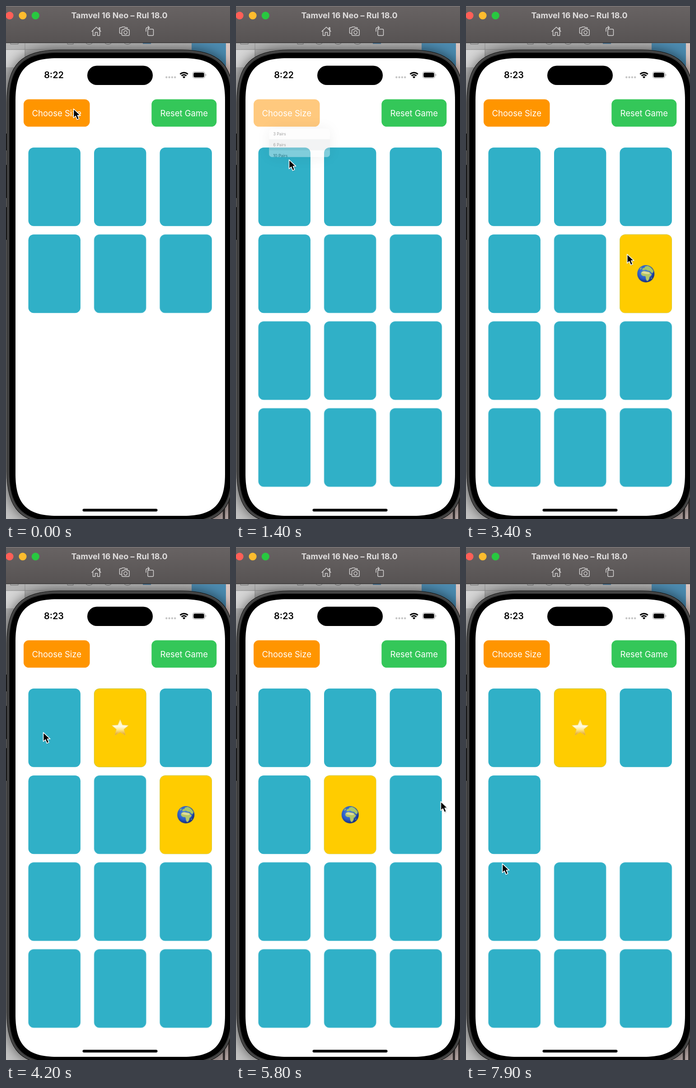
Animation, 496 px wide and 1130 px high, one loop 8000 ms. Source, as an HTML page:

```html
<!DOCTYPE html>
<html lang="en">
<head>
<meta charset="utf-8">
<title>Memory game</title>
<style>
html, body { margin: 0; width: 100%; height: 100%; overflow: hidden; background: #999; }
body { position: relative; font-family: Inter, "Open Sans", sans-serif; }
svg { position: absolute; left: 0; top: 0; width: 496px; height: 1130px; display: block; }
text { text-anchor: middle; }

/* every track runs on the same 8 s clock: 1.25% = 100 ms */
.t { animation: 8s linear infinite; }
.cut { animation-timing-function: step-end; }

#choose { animation-name: dim; }
@keyframes dim {
  0%, 1.25% { opacity: 1 }
  2.5%, 16.25% { opacity: .45 }
  17.5% { opacity: .5 }
  20.5%, 100% { opacity: 1 }
}

#menu {
  position: absolute; left: 0; top: 0; width: 288px; height: 153px; overflow: hidden;
  border-radius: 14px; background: #f9f9f9; color: #111; font-size: 18.5px;
  box-shadow: 0 0 70px rgba(0, 0, 0, .16); transform-origin: 0 0;
  animation-name: menu;
}
#menu div {
  height: 50px; line-height: 50px; padding-left: 20px; border-bottom: 1px solid #e4e4e4;
}
#menu .pick { animation-name: pick; }
@keyframes menu {
  0%, 6.25% { transform: translate(73px, 270px) scale(.47); opacity: 0; height: 134px;
    animation-timing-function: cubic-bezier(.2, .8, .3, 1) }
  10%, 16.25% { transform: translate(39px, 275px) scale(1); opacity: 1; height: 153px }
  17.5% { transform: translate(73px, 270px) scale(.47); opacity: .4; height: 134px }
  19.5%, 100% { transform: translate(95px, 266px) scale(.2); opacity: 0; height: 120px }
}
@keyframes pick {
  0% { background: #f9f9f9 }
  15%, 100% { background: #dfe1e2 }
}

#early { animation-name: early; }
#late { animation-name: late; }
@keyframes early { 0% { visibility: visible } 42.5%, 100% { visibility: hidden } }
@keyframes late { 0% { visibility: hidden } 42.5%, 100% { visibility: visible } }

.added { animation-name: added; }
.matched { animation-name: matched; }
@keyframes added { 0% { opacity: 0 } 16.25%, 100% { opacity: 1 } }
@keyframes matched { 0% { opacity: 1 } 80%, 100% { opacity: 0 } }

/* face-up periods of each turned card */
@keyframes face0 { 0%, 40%, 66.25%, 100% { opacity: 0 } 25%, 55% { opacity: 1 } }
@keyframes face1 { 0%, 55% { opacity: 0 } 48.75%, 93.75%, 100% { opacity: 1 } }
@keyframes face2 { 0%, 93.75%, 100% { opacity: 0 } 80% { opacity: 1 } }
@keyframes face4 { 0%, 40% { opacity: 0 } 32.5%, 63.75%, 100% { opacity: 1 } }
@keyframes face5 { 0%, 55% { opacity: 0 } 40%, 75%, 100% { opacity: 1 } }
@keyframes face7 { 0%, 93.75%, 100% { opacity: 0 } 85% { opacity: 1 } }

#cursor { animation-name: move; }
@keyframes move {
  0%, 6.25% { transform: translate(149px, 226px) }
  8.75% { transform: translate(147px, 236px) }
  13.75% { transform: translate(118px, 304px) }
  16.25% { transform: translate(116px, 312px) }
  17.5% { transform: translate(117px, 338px) }
  21.25% { transform: translate(110px, 392px) }
  25%, 27.5% { transform: translate(108px, 396px) }
  31.25% { transform: translate(232px, 575px) }
  33.75% { transform: translate(242px, 581px) }
  35% { transform: translate(250px, 582px) }
  38.75% { transform: translate(385px, 590px) }
  41.25% { transform: translate(390px, 590px) }
  45% { transform: translate(290px, 460px) }
  47.5%, 49.5% { transform: translate(242px, 414px) }
  52.5% { transform: translate(82px, 408px) }
  55% { transform: translate(95px, 398px) }
  60%, 62.4% { transform: translate(97px, 389px) }
  62.5%, 66.25% { transform: translate(238px, 591px) }
  69% { transform: translate(310px, 576px) }
  72.5% { transform: translate(453px, 560px) }
  75% { transform: translate(422px, 578px) }
  77.5% { transform: translate(412px, 556px) }
  80% { transform: translate(392px, 415px) }
  81.25% { transform: translate(380px, 440px) }
  85% { transform: translate(246px, 790px) }
  86.25%, 88.75% { transform: translate(244px, 810px) }
  92.5% { transform: translate(246px, 430px) }
  96%, 97.5% { transform: translate(245px, 418px) }
  98.7%, 100% { transform: translate(80px, 697px) }
}
</style>
</head>
<body>
<svg viewBox="0 0 496 1130">
  <defs>
    <linearGradient id="bar" x2="0" y2="1">
      <stop stop-color="#686363"/><stop offset="1" stop-color="#575353"/>
    </linearGradient>
    <linearGradient id="desk" x2="0" y2="1">
      <stop stop-color="#b4b4b4"/><stop offset=".5" stop-color="#b0b0b0"/><stop offset="1" stop-color="#c4c4c4"/>
    </linearGradient>
    <linearGradient id="blue" x2="0" y2="1">
      <stop stop-color="#4d8bb0"/><stop offset="1" stop-color="#3f83a8"/>
    </linearGradient>
    <linearGradient id="gold" x2="0" y2="1">
      <stop stop-color="#fff6a8"/><stop offset=".45" stop-color="#fffbe2"/><stop offset=".65" stop-color="#ffe88a"/><stop offset="1" stop-color="#dc981c"/>
    </linearGradient>
    <linearGradient id="glow" x2="1" y2="1">
      <stop offset=".4" stop-color="#ffe98a"/><stop offset=".75" stop-color="#ffe07a"/><stop offset="1" stop-color="#d9a72e"/>
    </linearGradient>
    <linearGradient id="hull">
      <stop stop-color="#7fb2d6"/><stop offset=".35" stop-color="#d3e3ee"/><stop offset=".65" stop-color="#a5bfd2"/><stop offset="1" stop-color="#4b6f8f"/>
    </linearGradient>
    <radialGradient id="sea" cx=".42" cy=".38" r=".62">
      <stop stop-color="#4f86e0"/><stop offset=".65" stop-color="#2a5bc6"/><stop offset="1" stop-color="#142c80"/>
    </radialGradient>
    <filter id="soft" x="-20%" y="-20%" width="140%" height="140%"><feGaussianBlur stdDeviation="14"/></filter>

    <path id="body" d="M2 213C2 129 34 97 118 97H388C472 97 504 129 504 213V1025C504 1109 472 1141 388 1141H118C34 1141 2 1109 2 1025Z"/>
    <g id="rocket" >
      <g transform="rotate(47)">
        <path d="M-6 13Q-8 20-5 25L-2 22L0 27L3 22L6 24Q8 19 6 13Z" fill="#f9a11b"/>
        <path d="M-4 13Q-5 18-2 20L0 23L2 20Q5 18 4 13Z" fill="#fff27a"/>
        <path d="M-6-2Q-14 5-11 18L-4 13ZM6-2Q14 5 11 18L4 13Z" fill="#e3211c"/>
        <path d="M0-27Q8.500-18 8.500-6Q8.500 6 5 14H-5Q-8.500 6-8.500-6Q-8.500-18 0-27Z" fill="url(#hull)"/>
        <path d="M0-27Q3.500-23.500 5.200-19.500Q0-17.500-5.200-19.500Q-3.500-23.500 0-27Z" fill="#5f87a8"/>
        <circle cy="-8" r="5" fill="#6b4650"/><circle cy="-8" r="3.600" fill="#11161f"/>
        <path d="M-1.300 4H1.300V17H-1.300Z" fill="#c11a14"/>
      </g>
    </g>
    <g id="earth">
      <circle r="19" fill="url(#sea)"/>
      <path d="M-11-1Q-9-6-4-6L2-5L8-4Q10 0 13 1Q12 5 8 7Q8 13 4 16Q1 16 0 11Q0 6-2 5Q-10 6-11-1Z" fill="#b4c666"/>
      <path d="M-10-2Q-8-5-3-5L7-3L9 0Q0 2-10-2Z" fill="#e2dc9a"/>
      <path d="M-8-8L-7-12L-3-13L-2-16L4-17.500Q13-14 17-6L15-1L11-3L9-6L4-7L0-9L-4-8Z" fill="#a9c766"/>
      <path d="M-14-9L-12-13L-9-14L-10-10ZM11 12L13 8L14 10Z" fill="#9cc065"/>
    </g>
    <path id="star" fill="url(#gold)" stroke="#f0c64a" stroke-width=".8" stroke-linejoin="round"
      d="M0-19L5.200-6.400L19-5.600L8.400 3.200L12 17L0 9.600L-12 17L-8.400 3.200L-19-5.600L-5.200-6.400Z"/>
    <g id="rainbow" fill="none" stroke-width="3.700"></g>
    <path id="moon" fill="url(#glow)" stroke="#c99d2c" stroke-width=".5"
      d="M8-18A19 19 0 1 1-18 8A18 18 0 0 0 8-18Z"/>
  </defs>

  <!-- desktop behind the window -->
  <rect width="496" height="1130" fill="url(#desk)"/>
  <path d="M0 96H42V135H0Z" fill="#d6d6d6"/>
  <path d="M42 82V150M0 96H411" stroke="#8b8b8b" fill="none"/>
  <path d="M10 82V84H27V82M136 82V84H149V82M177 82Q184 87 191 82M219 82Q226 87 233 82M262 82Q269 87 276 82" stroke="#666" fill="none"/>
  <path d="M303 82H321" stroke="#4e7d9f" stroke-width="3"/>
  <path d="M411 82H487V180H411Z" fill="url(#blue)"/>
  <path d="M487 82H496V200H487Z" fill="#d9c5c0"/>
  <path d="M440 1080H496V1130H440Z" fill="#b9a9a7"/>
  <path d="M480 1080H485V1130H480ZM492 1080H496V1130H492Z" fill="#3a3434"/>
  <use href="#body" filter="url(#soft)" opacity=".6"/>

  <!-- phone -->
  <path d="M0 281H4V318H0ZM0 350H4V423H0ZM0 443H4V515H0Z" fill="#1a1a1a"/>
  <use href="#body" fill="#3d3d3d" stroke="#1b1b1b" stroke-width="1.500"/>
  <path d="M3.800 213C3.800 130 35 98.800 118 98.800H388C471 98.800 502 130 502 213V1025C502 1108 471 1139 388 1139H118C35 1139 3.800 1108 3.800 1025Z" fill="none" stroke="#606060"/>
  <path d="M7.500 212C7.500 133 37.500 103 116.500 103H389.500C468.500 103 498.500 133 498.500 212V1026C498.500 1105 468.500 1135 389.500 1135H116.500C37.500 1135 7.500 1105 7.500 1026Z"/>
  <path d="M21 207C21 140.500 46.500 115 113 115H393C459.500 115 485 140.500 485 207V1031C485 1097.500 459.500 1123 393 1123H113C46.500 1123 21 1097.500 21 1031Z" fill="#fff"/>
  <rect x="180" y="131.500" width="145" height="42.500" rx="21.200"/>
  <rect x="169.500" y="1107.500" width="166" height="6" rx="3"/>

  <!-- status bar -->
  <g font-size="19.800" font-weight="600">
    <text id="early" class="t cut" x="106" y="159.300">8:22</text>
    <text id="late" class="t cut" x="106" y="159.300">8:23</text>
  </g>
  <path d="M355.300 157H376" stroke="#c6c6c6" stroke-width="4.400" stroke-linecap="round" stroke-dasharray="0 6.300"/>
  <path d="M385.500 150.300A12.300 12.300 0 0 1 402.700 150.300M388.700 153.800A7.500 7.500 0 0 1 399.500 153.800" fill="none" stroke="#000" stroke-width="3"/>
  <path d="M391 156.300A4.500 4.500 0 0 1 397.200 156.300L394.100 159.400Z"/>
  <rect x="413.500" y="145" width="27" height="14" rx="4.500" fill="none" stroke="#999" stroke-width="1.200"/>
  <rect x="415.300" y="146.800" width="23.400" height="10.400" rx="3"/>
  <path d="M442 149.800Q445 152 442 154.200Z" fill="#999"/>

  <!-- title bar -->
  <rect width="496" height="81" fill="url(#bar)"/>
  <path d="M0 .5H496" stroke="#8d8686"/>
  <path d="M0 81H496" stroke="#1d1b1b" stroke-width="1.200"/>
  <circle cx="8" cy="21" r="8.600" fill="#ff5f57"/>
  <circle cx="37" cy="21" r="8.600" fill="#febc2e"/>
  <circle cx="65.300" cy="21" r="8.600" fill="#28c840"/>
  <text x="251" y="27" font-size="18" font-weight="700" fill="#dedcdc">Tamvel 16 Neo – Rul 18.0</text>
  <g fill="none" stroke="#d5d3d3" stroke-width="1.500" stroke-linejoin="round" stroke-linecap="round">
    <path d="M190 56L200 46.500L210 56M192.500 54V65H197.500V58H202.500V65H207.500V54M206 52V47.500H208V53.500"/>
    <path d="M255 60.500H253.500Q251.500 60.500 251.500 58.500V49.500Q251.500 47.500 253.500 47.500H256L257.500 46H262.500L264 47.500H267Q269 47.500 269 49.500"/>
    <path d="M258.500 52H260.500L262 50.300H267.500L269 52H271Q273 52 273 54V63Q273 65 271 65H258.500Q256.500 65 256.500 63V54Q256.500 52 258.500 52Z"/>
    <circle cx="264.700" cy="58.300" r="3.700"/>
    <path d="M316 51H324.500Q326.500 51 326.500 53V63Q326.500 65 324.500 65H316Q314 65 314 63V53Q314 51 316 51ZM310 56V51Q310 47.500 313.500 47.500H317.500M314.500 44.500L317.500 47.500L314.500 50.500"/>
  </g>

  <!-- game -->
  <g font-size="18.500" fill="#fff">
    <g id="choose" class="t">
      <rect x="39" y="205.500" width="146.500" height="60.300" rx="11.500" fill="#ff9500"/>
      <text x="112.300" y="242.500">Choose Size</text>
    </g>
    <rect x="322.300" y="205.500" width="144" height="60.300" rx="11.500" fill="#34c759"/>
    <text x="394.300" y="242.500">Reset Game</text>
  </g>
  <g id="cards"></g>
</svg>

<div id="menu" class="t">
  <div>3 Pairs</div>
  <div class="pick t cut">6 Pairs</div>
  <div>10 Pairs</div>
</div>

<svg viewBox="0 0 496 1130">
  <g id="cursor" class="t">
    <path d="M1 2.500V22.500L5.700 18.300L9 26.300L13.400 24.400L10 16.700H16.500Z" fill="#000" opacity=".2"/>
    <path d="M.5 .5V20.500L5.200 16.300L8.500 24.300L12.700 22.500L9.400 14.800H15.700Z" stroke="#fff" stroke-width="1.600" stroke-linejoin="round"/>
  </g>
</svg>

<script>
const NS = 'http://www.w3.org/2000/svg';

function add(parent, tag, attrs) {
  const el = document.createElementNS(NS, tag);
  for (const key in attrs) el.setAttribute(key, attrs[key]);
  return parent.appendChild(el);
}

const rainbow = document.getElementById('rainbow');
['#e3262b', '#f98a1d', '#fbe13a', '#2fb344', '#2a62e0', '#6a2fc4'].forEach((stroke, i) => {
  const r = 36 - i * 3.4;
  add(rainbow, 'path', { d: `M${19 - r} 19A${r} ${r} 0 0 1 19 ${19 - r}`, stroke });
});

const faces = { 0: 'rocket', 1: 'star', 2: 'rainbow', 4: 'earth', 5: 'earth', 7: 'moon' };
const box = { x: -57.7, y: -86.5, width: 115.4, height: 173, rx: 12 };
const cards = document.getElementById('cards');

for (let i = 0; i < 12; i++) {
  const x = 107.2 + (i % 3) * 145.5;
  const y = 398.3 + Math.floor(i / 3) * 191.4;
  const state = i > 5 ? 'added' : faces[i] === 'earth' ? 'matched' : '';
  const card = add(cards, 'g', { transform: `translate(${x} ${y})`, class: state && `t cut ${state}` });
  add(card, 'rect', { ...box, fill: '#30b0c7' });
  if (!faces[i]) continue;
  const face = add(card, 'g', { class: 't cut', style: `animation-name: face${i}` });
  add(face, 'rect', { ...box, fill: '#fc0' });
  add(face, 'use', { href: '#' + faces[i] });
}
</script>
</body>
</html>
```
